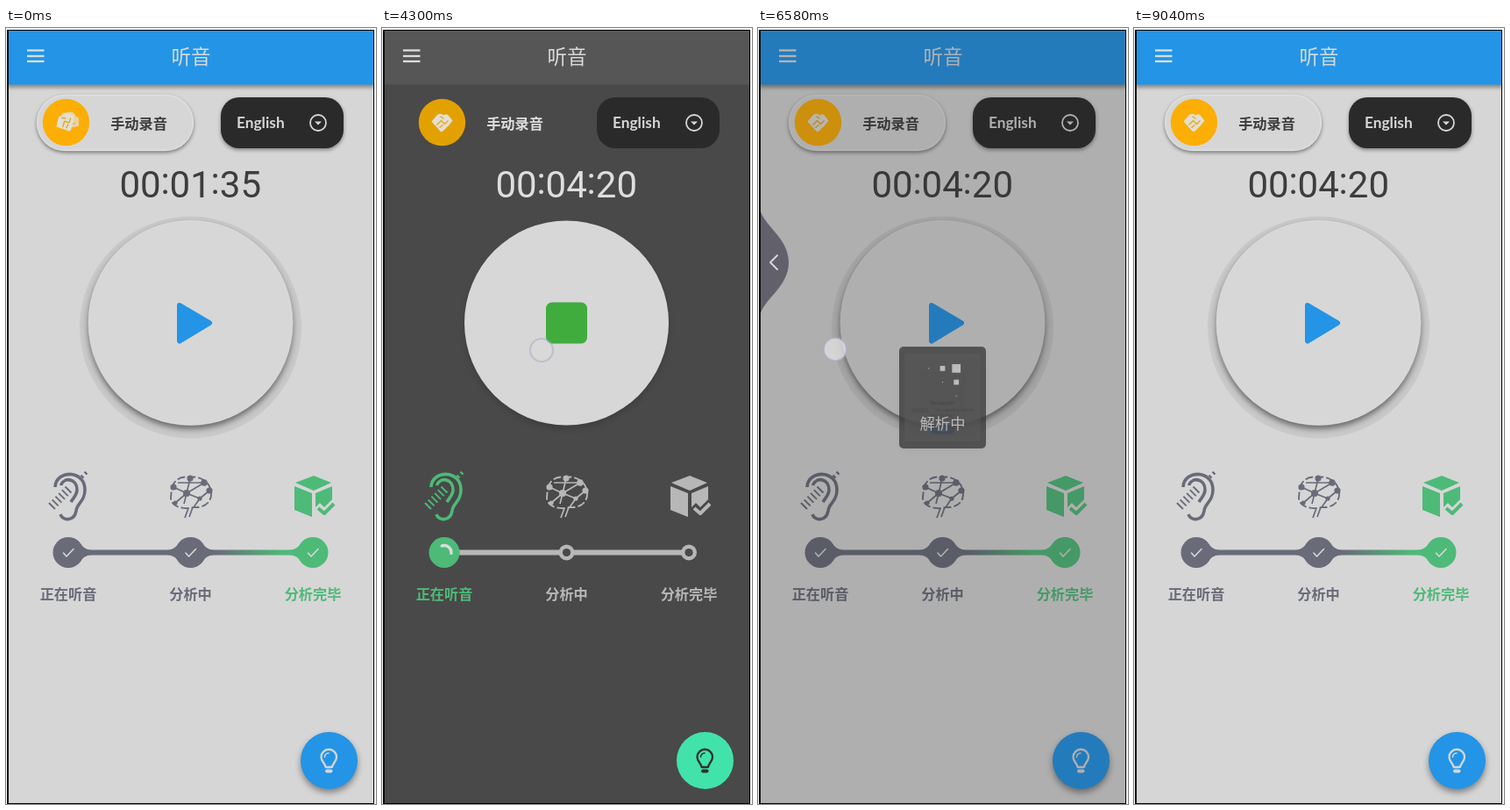
An HTML page with a canvas that plays this animation: 422 by 884 pixels, repeating every 9160 ms.

```html
<!DOCTYPE html>
<html lang="zh-CN">
<head>
<meta charset="utf-8">
<style>
html, body { margin: 0; width: 100%; height: 100%; overflow: hidden; background: #fff; }
canvas { display: block; }
</style>
</head>
<body>
<canvas id="stage" width="422" height="884"></canvas>
<script>
const LOOP = 9160, TAU = Math.PI * 2, RAD = Math.PI / 180;
const FONT = 'Roboto, "Noto Sans CJK SC", "Noto Sans CJK", sans-serif';
const GREEN = '#4dba78', BLUE = '#2394e6', PAPER = '#d7d7d7';
const LIGHT = { bg: '#d6d6d6', bar: BLUE, menu: '#dddddd', ink: '#3d3d3d', fab: BLUE, bulb: '#d6d6d6', idle: '#bcbcbc', done: '#696b79' };
const DARK = { ...LIGHT, bg: '#494949', bar: '#565656', ink: '#dedede', fab: '#42e3ab', bulb: '#303030', idle: '#b7b7b7' };
const RED = { ...LIGHT, bg: '#e5545b', menu: '#303030' };
const STEPS = [[71, '正在听音', ear], [210.5, '分析中', brain], [350, '分析完毕', box]];

const c = document.getElementById('stage').getContext('2d');

const ramp = (t, a, b) => Math.min(1, Math.max(0, (t - a) / (b - a)));
const smooth = u => u * u * (3 - 2 * u);
const pulse = (t, a, b, x, y) => ramp(t, a, b) * (1 - ramp(t, x, y));
const channel = (hex, i) => parseInt(hex.slice(i, i + 2), 16);
const mix = (a, b, k) =>
  `rgb(${[1, 3, 5].map(i => Math.round(channel(a, i) * (1 - k) + channel(b, i) * k))})`;

function blend(a, b, k) {
  const out = {};
  for (const key in a) out[key] = mix(a[key], b[key], k);
  return out;
}
function fill(path, color) { c.fillStyle = color; c.fill(path); }
function line(d, color, width, dash = []) {
  c.strokeStyle = color;
  c.lineWidth = width;
  c.setLineDash(dash);
  c.stroke(typeof d === 'string' ? new Path2D(d) : d);
  c.setLineDash([]);
}
function disc(x, y, r, color) {
  const p = new Path2D();
  p.arc(x, y, r, 0, TAU);
  if (color) fill(p, color);
  return p;
}
function round(x, y, w, h, r, color) {
  const p = new Path2D();
  p.roundRect(x, y, w, h, r);
  if (color) fill(p, color);
  return p;
}
function text(s, x, y, size, color, weight = 400, align = 'center', font = FONT) {
  c.font = `${weight} ${size}px ${font}`;
  c.textAlign = align;
  c.fillStyle = color;
  c.fillText(s, x, y);
}
function shaded(alpha, dy, blur, draw) {
  c.save();
  c.shadowColor = `rgba(0,0,0,${alpha})`;
  c.shadowOffsetY = dy;
  c.shadowBlur = blur;
  draw();
  c.restore();
}

function ear(color) {
  line('M56 523C57 503 90 503 90 526C90 540 81 541 80 550C78 562 65 562 62 554M62.5 521C66 511 81 513 81 526C81 532 77 535 74 540', color, 3.6);
  for (let i = 0; i < 6; i++) {
    const x = 52.5 + 3.7 * i, y = 544.5 - 3.7 * i;
    line(`M${x - 3.5} ${y - 3.5}l7 7`, color, 1.9);
  }
  line('M85.5 509.5l3 3M89.5 505.5l3 3', color, 2.4);
}
function brain(color) {
  line('M189 524C192 514 200 510 210 512C222 509 235 519 234 531C234 542 224 547 214 546C204 549 188 546 188 535Z', color, 1.9, [9, 3]);
  line('M191 523L206 530L210 513M196 518L226 518L206 530M206 530L203 542M193 541L206 530L221 536L232 527M221 536L214 546M204 558L208 547M209 557L213 546', color, 1.7);
  for (const [x, y, r] of [[191, 523, 3.6], [210, 513, 3.6], [226, 518, 3.8], [206, 530, 4], [232, 527, 3.6], [193, 541, 2.6], [221, 536, 2.6]])
    disc(x, y, r, color);
}
function box(color) {
  fill(new Path2D('M351 510L371 518L351 527L330 518ZM329 522L349 530V557L329 549ZM353 530L372 522V537L363 546L358 541L353 546Z'), color);
  line('M356 547L363 553L374 542', color, 4);
}

function handshake(turn) {
  c.save();
  c.translate(68.5, 107.5);
  c.rotate(turn);
  fill(new Path2D('M-12 -1L-5 -9Q-1 -11 2 -8Q5 -11 8 -7L12 -2L8 3L1 10Q-1 12 -3 9Z'), '#e2dfd5');
  line('M-6 3L-1 -2L3 2L7 -2M-3 6L1 3M-2 -7L2 -4', '#e8a814', 1.4);
  c.restore();
}

function header(th, shade, rim) {
  shaded(.35 * shade, 3, 4, () => { c.fillStyle = th.bar; c.fillRect(2, 2, 418, 62.5); });
  for (const y of [25.5, 32, 38]) line(`M24 ${y}H43.5`, th.menu, 2.3);
  text('听音', 211, 41, 22.5, '#d9d9d9', 500);
  shaded(.45 * shade, 2, 4, () => round(35, 76, 179, 64, 32, th.bg));
  line(round(35.5, 76.5, 178, 63, 31.5), `rgba(240,240,240,${.45 * rim})`, 1.5);
}

function controls(t, th, shade) {
  disc(68.5, 107.5, 26.7, shade < .5 ? '#e3a100' : '#fcae04');
  const turning = 1 - ramp(t, 100, 490);
  if (turning > 0) {
    c.globalAlpha = .75 * turning;
    c.save();
    c.translate(4, -2);
    handshake(.7 * turning);
    c.restore();
    c.globalAlpha = 1;
  }
  handshake(-.5 * turning);
  text('手动录音', 151.5, 115, 16.2, th.ink, 700);

  if (t < 4390 || t > 5960) {
    shaded(.4 * shade, 2, 4, () => round(245, 79, 140, 58, 21, '#2a2a2a'));
    text('English', 263, 114, 17.3, '#d6d6d6', 700, 'left', 'Lato, sans-serif');
    line(disc(356, 108, 9), '#d6d6d6', 1.8);
    fill(new Path2D('M352 106.5H360L356 110.5Z'), '#d6d6d6');
  }
}

function timer(t, th) {
  const cs = Math.round(Math.min(420, (t - 956) * .1256));
  const pad = n => String(n).padStart(2, '0');
  const parts = t < 956 ? ['00', '01', '35'] : ['00', pad(Math.floor(cs / 100)), pad(cs % 100)];
  parts.forEach((s, i) => {
    text(s, 153 + 57.2 * i, 193, 42, th.ink);
    if (i) text(':', 124.3 + 57.2 * i, 189, 42, th.ink);
  });
}

function bigButton(stop, shade, rim) {
  disc(210.5, 341, 126.5, `rgba(0,0,0,${.06 * shade})`);
  shaded(.15 + .35 * shade, 4, 7, () => disc(210.5, 336, 116.5, PAPER));
  line(disc(210.5, 336, 116.5), `rgba(235,235,235,${.5 * rim})`, 1);
  c.globalAlpha = 1 - stop;
  const play = new Path2D('M198 316L232 336L198 356.5Z');
  fill(play, BLUE);
  line(play, BLUE, 6);
  c.globalAlpha = stop;
  round(187, 312.5, 47, 47, 7, '#40ac3e');
  c.globalAlpha = 1;
}

function spinner(x, t, offset) {
  const turns = (t - 2110 + offset) / 1333 + .13;
  const n = Math.floor(turns), p = turns - n;
  const head = 270 * smooth(ramp(p, 0, .5)), tail = 270 * smooth(ramp(p, .5, 1));
  const from = 150 + tail + 270 * n + .181 * (t - 2110) + (offset ? 68 : 0);
  const arc = new Path2D();
  arc.arc(x, 597.5, 8, from * RAD, (from + Math.max(2, head - tail)) * RAD);
  line(arc, '#dcdcdc', 3.4);
}

function neck(x, side, color) {
  const at = d => x + side * d;
  fill(new Path2D(`M${at(11)} 584Q${at(18)} 595 ${at(27)} 595V600Q${at(18)} 600 ${at(11)} 611Z`), color);
}

function progress(t, th) {
  const stage = t < 950 ? 2 : t < 4390 ? 0 : t < 5960 ? 1 : 2;
  const tone = i => i < stage ? th.done : i === stage ? GREEN : th.idle;
  c.lineCap = 'butt';
  for (let i = 0; i < 2; i++) {
    const a = STEPS[i][0], b = STEPS[i + 1][0];
    let color = th.idle;
    if (i < stage) {
      color = c.createLinearGradient(a, 0, b, 0);
      color.addColorStop(.2, th.done);
      color.addColorStop(.75, tone(i + 1));
    }
    line(`M${a + 8} 597.5H${b - 8}`, color, 5.8);
  }
  STEPS.forEach(([x, label, icon], i) => {
    const color = tone(i);
    c.lineCap = 'butt';
    icon(color);
    c.lineCap = 'round';
    text(label, x, 651, 16.2, color, 700);
    if (i > stage) {
      disc(x, 597.5, 9, color);
      disc(x, 597.5, 4.6, th.bg);
      return;
    }
    disc(x, 597.5, 17.5, color);
    if (i > 0) neck(x, -1, color);
    if (i < stage) neck(x, 1, color);
    if (i < stage || i === 2) line(`M${x - 5.5} 598L${x - 2} 602L${x + 6} 593.5`, '#d8d8d8', 1.6);
    else spinner(x, t, stage ? 143 : 0);
  });
}

function fab(th, shade) {
  shaded(.4 * shade, 4, 7, () => disc(368.5, 834.5, 32.5, th.fab));
  line('M364.5 842C364 837 359.5 836 359.5 830.5A8.7 8.7 0 0 1 377 830.5C377 836 372.5 837 372 842Z', th.bulb, 2.3);
  line('M363.5 830.5A4.8 4.8 0 0 1 368 826', th.bulb, 1.5);
  line('M366 846.5H370.5', th.bulb, 4);
}

function scrim(t) {
  const a = .45 * pulse(t, 6500, 6660, 8740, 9000);
  c.fillStyle = `rgba(40,40,40,${a})`;
  c.fillRect(2, 2, 418, 882);
}

function success(t) {
  const k = smooth(ramp(t, 6500, 6740)), out = 1 - smooth(ramp(t, 8740, 8980));
  if (k * out <= 0) return;
  c.save();
  c.globalAlpha = Math.min(1, k * 2) * out;
  c.translate(210.5, 420.5);
  c.scale(k * out, k * out);
  c.translate(-210.5, -420.5);
  shaded(.2, 5, 14, () => round(47.5, 231.5, 326, 379, 11, PAPER));

  const pop = smooth(ramp(t, 6750, 7100));
  if (pop > 0) disc(210.5, 318.5, 38 * pop, '#00c853');
  const tick = ramp(t, 7050, 7400);
  if (tick > 0) {
    c.lineCap = 'butt';
    line('M188.5 318.5L202.5 333L232 303', '#e0e0e0', 5.8, [64 * tick, 100]);
    c.lineCap = 'round';
  }
  text('Success!!!', 210, 451.5, 23, '#3a3a3a', 700);
  text('分析成功：" I\'m standing here to', 210.5, 482, 19, '#414141');
  text('test an app."', 210.5, 504, 19, '#414141');
  round(159.5, 539, 102.5, 41, 20.5, '#3787d3');
  text('确定', 210.5, 566.5, 16.5, '#dedede', 700);
  c.restore();
}

function loading(t) {
  c.globalAlpha = pulse(t, 5080, 5220, 6540, 6720);
  if (c.globalAlpha === 0) return;
  round(161, 363, 99, 116, 5, '#383838');
  const turn = ((t - 5116) / 1200 + 2) % 2, phase = turn > 1 ? 2 - turn : turn;
  for (let row = 0; row < 3; row++) for (let col = 0; col < 3; col++) {
    const start = .1 * (3 + col - row);
    const size = 15.8 * (1 - Math.pow(ramp(phase, start, start + .5), 1.65));
    c.fillStyle = '#dadada';
    c.fillRect(194.8 + 15.7 * col - size / 2, 387.8 + 15.7 * row - size / 2, size, size);
  }
  text('解析中', 210.5, 457, 17.3, '#dadada');
  c.globalAlpha = 1;
}

function backEdge(t) {
  const k = smooth(ramp(t, 6430, 6560)) * (1 - smooth(ramp(t, 6640, 6800)));
  if (k <= 0) return;
  const tip = 3 + 32 * k;
  fill(new Path2D(`M2 205C5 225 ${tip} 238 ${tip} 267C${tip} 296 5 309 2 329Z`), '#62606a');
  c.globalAlpha = k;
  line(`M${tip - 13} 259L${tip - 21} 267L${tip - 13} 275`, '#d8d8d8', 1.8);
  c.globalAlpha = 1;
}

function touch(alpha, x, y, r, white) {
  if (alpha <= 0) return;
  c.globalAlpha = alpha;
  line(disc(x, y, r, `rgba(222,222,222,${white})`), 'rgba(165,168,200,.55)', 2.2);
  c.globalAlpha = 1;
}

function draw(t) {
  const dark = ramp(t, 930, 1150) * (1 - ramp(t, 4360, 4580));
  const red = pulse(t, 7500, 7720, 8150, 8320);
  const th = dark > 0 ? blend(LIGHT, DARK, dark) : blend(LIGHT, RED, red);
  const shade = 1 - dark, rim = shade * (1 - red);

  c.fillStyle = '#fff';
  c.fillRect(0, 0, 422, 884);
  c.save();
  c.beginPath();
  c.rect(2, 2, 418, 882);
  c.clip();
  c.lineCap = 'butt';
  c.lineJoin = 'round';
  c.fillStyle = th.bg;
  c.fillRect(0, 0, 422, 884);
  header(th, shade, rim);
  controls(t, th, shade);
  timer(t, th);
  bigButton(dark, shade, rim);
  progress(t, th);
  fab(th, shade);
  scrim(t);
  success(t);
  loading(t);
  backEdge(t);
  touch(t >= 760 ? 1 - ramp(t, 910, 1000) : 0, 217, 332, 14, .4);
  touch(pulse(t, 4230, 4260, 4290, 4420), 182, 367, 13, .3);
  touch(pulse(t, 6430, 6460, 6620, 6720), 10 + 78 * smooth(ramp(t, 6430, 6575)), 366, 13, .8);
  c.restore();

  c.fillStyle = '#000';
  c.fillRect(1, 2, 2, 882);
  c.fillRect(1, 2, 419, 1);
  c.fillRect(419, 2, 1, 882);
  c.fillRect(1, 883, 419, 1);
}

const began = performance.now();
function tick() {
  draw((performance.now() - began) % LOOP);
  requestAnimationFrame(tick);
}
tick();
</script>
</body>
</html>
```
